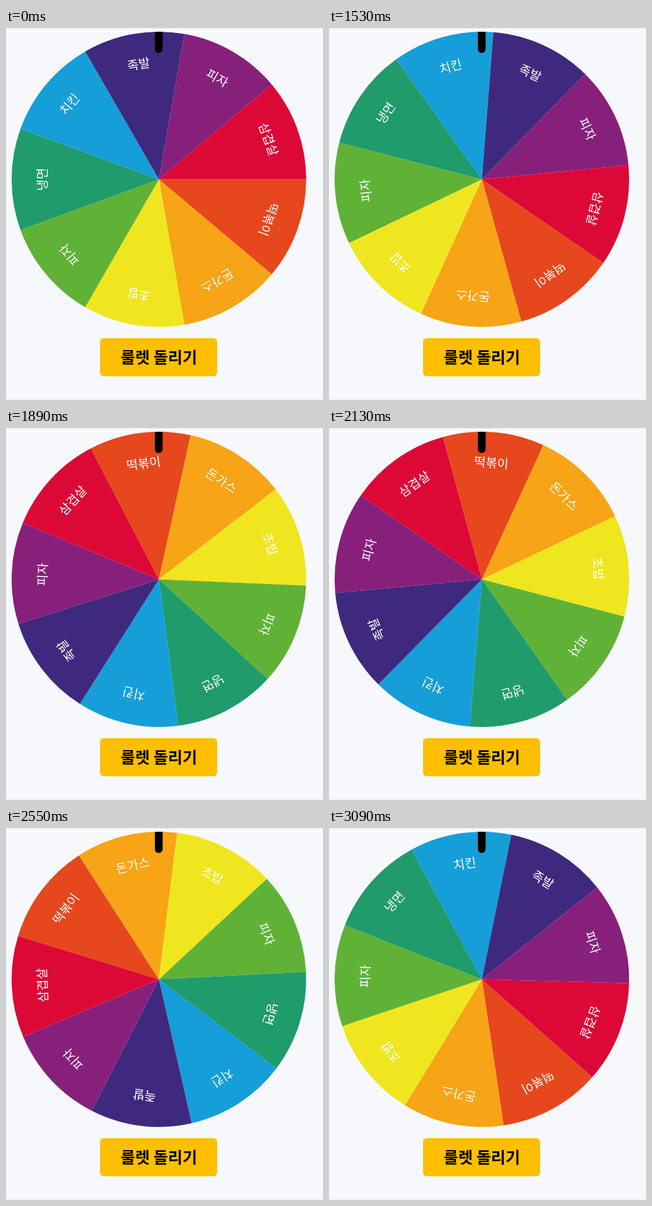
An HTML page with a canvas for the animation above (3.69 s loop, 509 by 596 pixels).

```html
<!DOCTYPE html>
<html lang="ko">
<head>
<meta charset="utf-8">
<style>
  html, body { margin: 0; width: 100%; height: 100%; overflow: hidden; background: #f6f8fc; }
  canvas { display: block; }
</style>
</head>
<body>
<canvas id="stage"></canvas>
<script>
const W = 509, H = 596, LOOP = 3690, STEP = 30;
const CX = 245.5, CY = 242.5, RADIUS = 236.5, LABEL_RADIUS = 180;
const FONT = '"Noto Sans CJK KR", "Noto Sans KR", "Noto Sans CJK", sans-serif';
const SLICES = [
  ['떡볶이', '#e6471d'], ['돈가스', '#f7a416'], ['초밥', '#efe61f'],
  ['피자', '#60b236'], ['냉면', '#209b6c'], ['치킨', '#169ed8'],
  ['족발', '#3f297e'], ['피자', '#87207b'], ['삼겹살', '#dc0936']
];
const ARC = 2 * Math.PI / SLICES.length;

const PRESS = 1125, RELEASE = 1250, FADE = 180;
const TURN = 4001.5;
// Spin progress before easing: [time in ms, progress]
const SPIN = [[RELEASE, 0], [1530, .1515], [1890, .3474], [2370, .6156], [2760, .8402], [3075, 1]];

const canvas = document.getElementById('stage');
const ctx = canvas.getContext('2d');
const ratio = window.devicePixelRatio || 1;
canvas.width = W * ratio;
canvas.height = H * ratio;
canvas.style.width = W + 'px';
canvas.style.height = H + 'px';
ctx.scale(ratio, ratio);
ctx.textAlign = 'center';

// CSS "ease": cubic-bezier(.25, .1, .25, 1)
function ease(x) {
  if (x <= 0) return 0;
  if (x >= 1) return 1;
  const curve = (s, a, b) => 3 * (1 - s) ** 2 * s * a + 3 * (1 - s) * s * s * b + s ** 3;
  let lo = 0, hi = 1;
  for (let i = 0; i < 30; i++) {
    const mid = (lo + hi) / 2;
    if (curve(mid, .25, .25) < x) lo = mid; else hi = mid;
  }
  return curve(lo, .1, 1);
}

function spinAngle(t) {
  if (t <= RELEASE) return 0;
  const i = SPIN.findIndex(([time]) => time > t);
  if (i < 0) return TURN * Math.PI / 180;
  const [t0, p0] = SPIN[i - 1], [t1, p1] = SPIN[i];
  return TURN * ease(p0 + (p1 - p0) * (t - t0) / (t1 - t0)) * Math.PI / 180;
}

function pressAmount(t) {
  if (t < RELEASE) return ease((t - PRESS) / FADE);
  const peak = ease((RELEASE - PRESS) / FADE);
  return peak * (1 - ease((t - RELEASE) / (FADE * peak)));
}

function mix(from, to, k) {
  return `rgb(${from.map((c, i) => Math.round(c + (to[i] - c) * k))})`;
}

function fillRound(x, y, w, h, radii) {
  ctx.beginPath();
  ctx.roundRect(x, y, w, h, radii);
  ctx.fill();
}

function drawWheel(angle) {
  ctx.save();
  ctx.translate(CX, CY);
  ctx.rotate(angle);
  SLICES.forEach(([, color], i) => {
    ctx.fillStyle = color;
    ctx.beginPath();
    ctx.moveTo(0, 0);
    ctx.arc(0, 0, RADIUS, i * ARC, (i + 1) * ARC);
    ctx.fill();
  });
  ctx.font = '500 20px ' + FONT;
  ctx.fillStyle = '#fff';
  ctx.rotate(Math.PI / 2 + ARC / 2);
  for (const [label] of SLICES) {
    ctx.fillText(label, 0, -LABEL_RADIUS);
    ctx.rotate(ARC);
  }
  ctx.restore();
}

function drawButton(k) {
  ctx.fillStyle = mix([254, 191, 0], [68, 68, 68], k);
  fillRound(151, 497, 188, 61, 6);
  ctx.fillStyle = mix([0, 0, 0], [249, 249, 249], k);
  ctx.font = 'bold 25.5px ' + FONT;
  ctx.fillText('룰렛 돌리기', 245.5, 537);
}

function draw(t) {
  ctx.fillStyle = '#f6f8fc';
  ctx.fillRect(0, 0, W, H);
  ctx.fillStyle = '#e3eef4';
  ctx.fillRect(0, 0, W, 1);
  ctx.fillRect(0, H - 2, W, 1);
  drawWheel(spinAngle(t));
  ctx.fillStyle = '#000';
  fillRound(239, 6, 12.5, 34, [0, 0, 6, 6]);
  drawButton(pressAmount(t));
}

const start = performance.now();
function tick() {
  const t = (performance.now() - start) % LOOP;
  draw(Math.floor(t / STEP) * STEP);
  requestAnimationFrame(tick);
}
tick();
</script>
</body>
</html>
```
